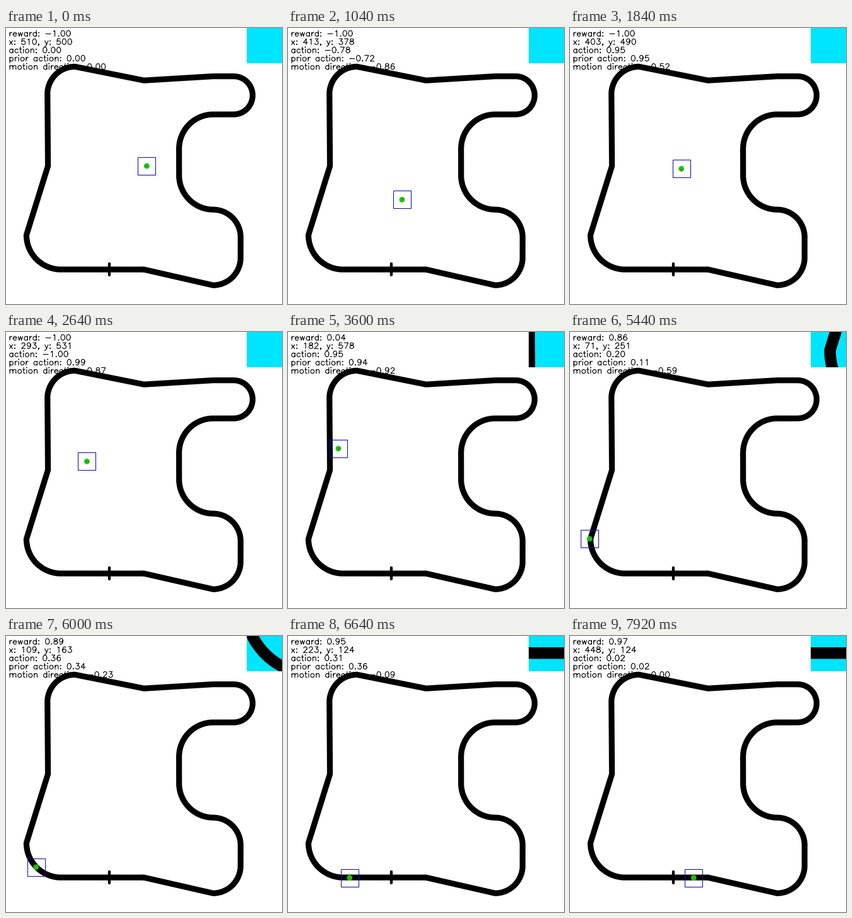
A matplotlib script that plays this animation: 438x438 px, repeating every 8 s.

```python
import numpy as np
import matplotlib.pyplot as plt
from matplotlib.animation import FuncAnimation
from matplotlib.patches import Circle, Rectangle

SIZE, DPI, WORLD = 438, 100, 1000
FRAMES, INTERVAL = 100, 80
UNIT = SIZE / WORLD * 72 / DPI  # points per world unit
VIEW = 32                       # half width of the car's field of view
SPEED = 14


def line(*coords):
    return np.array(coords, float).reshape(-1, 2)


def arc(cx, cy, rx, ry, start, end):
    t = np.radians(np.linspace(start, end, 30))
    return np.column_stack([cx + rx * np.cos(t), cy + ry * np.sin(t)])


def dot(x, y):
    return line(x - 1, y, x, y - 1, x + 1, y, x, y + 1, x - 1, y)


def hump(x):
    return line(x, 10, x + 3, 13, x + 5, 14, x + 8, 14,
                x + 10, 13, x + 11, 10, x + 11, 0)


BOWL = arc(9.5, 7, 6.5, 7, 30, 330)
STEM = line(4, 14, 4, 0)

# Single-stroke letters: advance width, then strokes.
GLYPHS = {
    " ": (16,),
    "a": (19, BOWL, line(15, 14, 15, 0)),
    "c": (18, BOWL),
    "d": (19, BOWL, line(15, 21, 15, 0)),
    "e": (18, line(3, 8, 15, 8), arc(9.3, 7, 6.3, 7, 8, 325)),
    "i": (8, STEM, dot(4, 21)),
    "m": (30, STEM, hump(4), hump(15)),
    "n": (19, STEM, hump(4)),
    "o": (19, arc(9.5, 7, 6.5, 7, 0, 360)),
    "p": (19, line(4, 14, 4, -7), arc(9.5, 7, 6.5, 7, -150, 150)),
    "r": (13, STEM, line(4, 8, 5, 11, 7, 13, 9, 14, 12, 14)),
    "t": (12, line(5, 21, 5, 4, 6, 1, 8, 0, 10, 0), line(2, 14, 9, 14)),
    "w": (22, line(3, 14, 7, 0, 11, 14, 15, 0, 19, 14)),
    "x": (17, line(3, 14, 14, 0), line(14, 14, 3, 0)),
    "y": (16, line(2, 14, 8, 0), line(14, 14, 8, 0, 6, -4, 4, -6, 1, -7)),
    ":": (10, dot(5, 13), dot(5, 1)),
    ".": (10, dot(5, 1)),
    ",": (10, dot(5, 1), line(6, 1, 6, -1, 4, -4)),
    "-": (26, line(4, 9, 22, 9)),
    "0": (20, arc(10, 10.5, 7, 10.5, 0, 360)),
    "1": (20, line(6, 17, 8, 18, 11, 21, 11, 0)),
    "2": (20, arc(10, 15.5, 6, 5.5, 175, -30),
          line(15.2, 12.7, 13, 10, 3, 0, 17, 0)),
    "3": (20, line(5, 21, 16, 21, 10, 13), arc(10, 6.5, 7, 6.5, 90, -160)),
    "4": (20, line(13, 0, 13, 21, 3, 7, 18, 7)),
    "5": (20, line(15, 21, 5, 21, 4, 11.3), arc(9.7, 7, 7.3, 7, 142, -155)),
    "6": (20, arc(10.3, 6.5, 6.3, 6.5, 0, 360), arc(11, 9, 7, 12, 50, 190)),
    "7": (20, line(3, 21, 17, 21, 7, 0)),
    "8": (20, arc(10, 16.5, 6, 4.5, 0, 360), arc(10, 6, 7, 6, 0, 360)),
    "9": (20, arc(9.7, 14.5, 6.3, 6.5, 0, 360), arc(9, 12, 7, 12, 10, -130)),
}


def text_strokes(text, x, y):
    """All strokes of a text row, separated by NaN breaks."""
    parts = [np.full((1, 2), np.nan)]
    for char in text:
        advance, *strokes = GLYPHS[char]
        for stroke in strokes:
            parts += [stroke + (x, y), np.full((1, 2), np.nan)]
        x += advance
    return np.vstack(parts).T


TRACK = np.vstack([
    line(500, 125),
    arc(200, 250, 126, 125, 270, 180),
    line(152, 500),
    arc(250, 760, 100, 100, 180, 90),
    line(500, 810, 750, 825),
    arc(825, 756, 68.5, 69, 90, -90),
    arc(751, 562, 124, 125, 90, 180),
    arc(751, 467, 124, 125, 180, 270),
    arc(750, 242, 100, 100, 90, 0),
    arc(750, 168, 100, 100, 0, -90),
    line(500, 125),
]).T

# Waypoints: frame, x, y, heading in half turns.
ROUTE = np.array([
    (0, 510, 500, 0), (3, 540, 476, -.42), (5, 532, 444, -.75),
    (11, 445, 392, -.84), (13, 413, 378, -.86), (22, 402, 478, .42),
    (33, 293, 531, .87), (44, 195, 578, .95), (55, 126, 440, -.63),
    (66, 78, 273, -.59), (68, 71, 251, -.59), (77, 132, 145, -.18),
    (83, 223, 124, -.09), (88, 293, 124, 0), (99, 448, 124, 0),
])

ACTIONS = np.array([
    (0, 0), (1, -1), (5, -.97), (7, -.1), (11, -.6), (12, -.72), (13, -.78),
    (16, -.96), (21, -.9), (22, .95), (32, .99), (33, -1), (36, -.98),
    (37, .9), (47, .96), (50, .6), (54, .26), (55, .27), (62, -.04),
    (67, .11), (68, .20), (76, .38), (82, .36), (83, .31), (88, .06),
    (92, .02), (99, .02),
])

REWARDS = np.array([
    (45, .04), (49, .93), (55, .85), (60, .91), (68, .86), (77, .9),
    (83, .95), (88, .97),
])


def pose(frame):
    """Hermite curve through the waypoints: position and heading."""
    k = min(np.searchsorted(ROUTE[:, 0], frame, "right") - 1, len(ROUTE) - 2)
    (f0, *p0, d0), (f1, *p1, d1) = ROUTE[k], ROUTE[k + 1]
    p0, p1, span = np.array(p0), np.array(p1), f1 - f0
    v0, v1 = (SPEED * span * np.array([np.cos(d * np.pi), np.sin(d * np.pi)])
              for d in (d0, d1))
    s = (frame - f0) / span
    pos = ((2 * s**3 - 3 * s**2 + 1) * p0 + (s**3 - 2 * s**2 + s) * v0
           + (3 * s**2 - 2 * s**3) * p1 + (s**3 - s**2) * v1)
    vel = (6 * (s - s**2) * (p1 - p0) + (3 * s**2 - 4 * s + 1) * v0
           + (3 * s**2 - 2 * s) * v1)
    return pos, np.arctan2(vel[1], vel[0]) / np.pi


def action(frame):
    return np.interp(frame, *ACTIONS.T)


def reward(frame):
    return np.interp(frame, *REWARDS.T) if frame >= REWARDS[0, 0] else -1


def number(value):
    return f"{round(float(value), 2) + 0.0:.2f}"


fig = plt.figure(figsize=(SIZE / DPI, SIZE / DPI), dpi=DPI, facecolor="white")


def make_axes(rect, color):
    axes = fig.add_axes(rect, facecolor=color)
    axes.set(xlim=(0, WORLD), ylim=(0, WORLD), xticks=[], yticks=[])
    for spine in axes.spines.values():
        spine.set_visible(False)
    return axes


def draw_track(axes, scale):
    axes.plot(*TRACK, color="black", lw=21 * UNIT * scale,
              solid_joinstyle="round", solid_capstyle="round")


ax = make_axes([0, 0, 1, 1], "white")
side = 4 * VIEW / WORLD
inset = make_axes([1 - side, 1 - side, side, side], "#00e5ff")
draw_track(ax, 1)
draw_track(inset, 2)
ax.plot([375, 375], [105, 145], color="black", lw=10 * UNIT,
        solid_capstyle="round")

rows = [ax.plot([], [], color="black", lw=2.6 * UNIT,
                solid_capstyle="round")[0] for _ in range(5)]
box = ax.add_patch(Rectangle((0, 0), 2 * VIEW, 2 * VIEW, fill=False,
                             ec="#1010b4", lw=2.4 * UNIT, zorder=4))
car = ax.add_patch(Circle((0, 0), 10, fc="#10c810", ec="none", zorder=5))
tail, = ax.plot([], [], color="#f02010", lw=2.2 * UNIT, zorder=6,
                solid_capstyle="butt")


def update(frame):
    (x, y), heading = pose(frame)
    angle = heading * np.pi
    box.set_xy((x - VIEW, y - VIEW))
    car.center = (x, y)
    tail.set_data([x, x - 10 * np.cos(angle)], [y, y - 10 * np.sin(angle)])
    inset.set_xlim(x - VIEW, x + VIEW)
    inset.set_ylim(y - VIEW, y + VIEW)

    texts = [
        f"reward: {number(reward(frame))}",
        f"x: {x:.0f}, y: {y:.0f}",
        f"action: {number(action(frame))}",
        f"prior action: {number(action(max(frame - 1, 0)))}",
        f"motion direction: {number(heading)}",
    ]
    for i, (row, text) in enumerate(zip(rows, texts)):
        row.set_data(*text_strokes(text, 10, WORLD - 30 * (i + 1)))
    return [*rows, box, car, tail]


anim = FuncAnimation(fig, update, frames=FRAMES, interval=INTERVAL,
                     repeat=True, blit=False)
plt.show()
```
